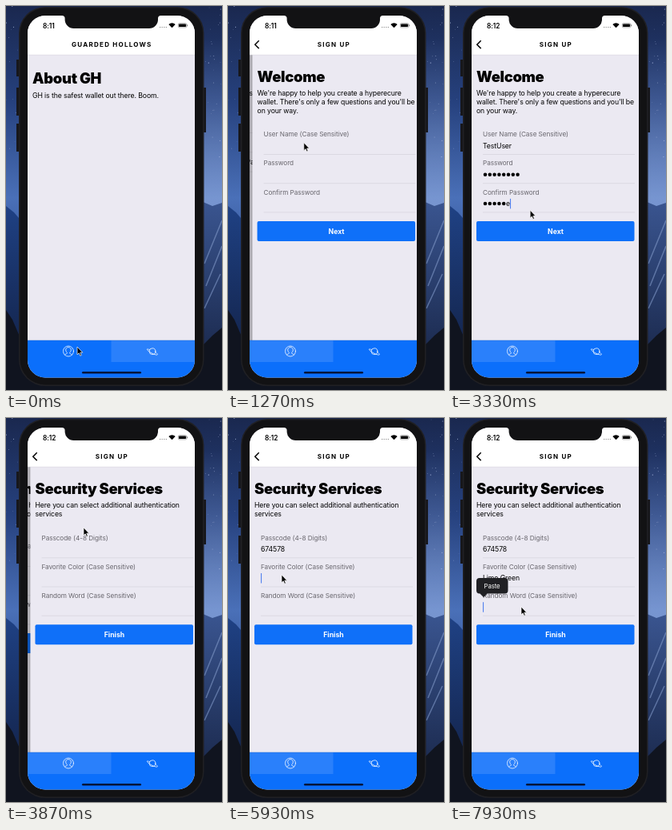
Recreate the animation shown at these times as an HTML page. Size 270x480 px, loop 8 s.

```html
<!DOCTYPE html>
<html lang="en">
<head>
<meta charset="utf-8">
<title>Wallet sign-up</title>
<style>
  html, body { margin: 0; width: 100%; height: 100%; overflow: hidden; background: #101a3a; }
  svg { display: block; width: 100vw; height: 100vh; font: 8.7px Inter, Roboto, sans-serif; letter-spacing: -.1px; }
  .h1 { font-size: 18.4px; font-weight: 900; letter-spacing: -.32px; }
  .title { font-size: 8px; font-weight: 700; letter-spacing: 1.25px; text-anchor: middle; }
  .label { font-size: 8.2px; fill: #68666d; letter-spacing: -.06px; }
  .item { font-size: 9.1px; letter-spacing: -.02px; }
  .button { font-weight: 700; fill: #fff; text-anchor: middle; letter-spacing: 0; }
  .rule { stroke: #d5d3db; stroke-width: .7; }
  .icon { fill: none; stroke: #45434a; stroke-width: .75; stroke-linecap: round; }
  .tab { stroke: #fff; }
  .dots { stroke: #000; stroke-width: 4.5; stroke-linecap: round; stroke-dasharray: 0 5.8; }
  .caret { stroke: #4377ee; stroke-width: 1; }
</style>
</head>
<body>
<svg viewBox="0 0 270 480" preserveAspectRatio="none">
  <defs>
    <linearGradient id="sky" x2="0" y2="1">
      <stop offset="0" stop-color="#1a284f"/>
      <stop offset=".25" stop-color="#26417e"/>
      <stop offset=".5" stop-color="#4a70b8"/>
      <stop offset=".75" stop-color="#2c4a88"/>
    </linearGradient>
    <linearGradient id="glow" x2="0" y2="1">
      <stop offset="0" stop-color="#a9bfec" stop-opacity="0"/>
      <stop offset="1" stop-color="#a9bfec" stop-opacity=".5"/>
    </linearGradient>
    <linearGradient id="leftRock" x2="0" y2="1">
      <stop offset="0" stop-color="#1f4184"/>
      <stop offset="1" stop-color="#101c3c"/>
    </linearGradient>
    <linearGradient id="rightRock" x2="0" y2="1">
      <stop offset="0" stop-color="#3a5590"/>
      <stop offset="1" stop-color="#14203f"/>
    </linearGradient>
    <linearGradient id="edge">
      <stop offset="0" stop-color="#000" stop-opacity="0"/>
      <stop offset="1" stop-color="#000" stop-opacity=".1"/>
    </linearGradient>
    <clipPath id="screen"><rect x="27" y="12" width="209" height="452.500" rx="22"/></clipPath>
    <clipPath id="content"><rect x="27" y="61" width="209" height="357"/></clipPath>
  </defs>

  <rect width="270" height="480" fill="url(#sky)"/>
  <rect x="200" y="40" width="70" height="215" fill="url(#glow)"/>
  <g id="stars" fill="#aebbe0"></g>
  <path d="M0 250 10 258 22 272V480H0Z" fill="url(#leftRock)"/>
  <path d="M270 246 258 250 244 244V480H270Z" fill="url(#rightRock)"/>
  <path d="M270 268 248 322M270 300 250 350M268 335 248 378" stroke="#8199c8" stroke-width="1.500" opacity=".6"/>
  <path d="M0 380 8 392 20 420 60 470H210L246 424 258 412 270 402V480H0Z" fill="#10141f"/>

  <path d="M13 67h5v21h-5zM13 102h5v35h-5zM13 147h5v35h-5zM245 102h5v56h-5z" fill="#17171b"/>
  <rect x="16" y="1" width="231.500" height="474" rx="33" fill="#202024"/>
  <rect x="17.500" y="2.500" width="228.500" height="471" rx="31.500" fill="#121214"/>

  <g clip-path="url(#screen)">
    <rect x="27" y="10" width="209" height="455" fill="#ebe9f2"/>

    <g clip-path="url(#content)">
      <rect x="27" y="61" width="209" height="357" fill="#000"/>
      <g id="about">
        <rect x="27" y="61" width="209" height="357" fill="#ebe9f2"/>
        <text class="h1" x="33" y="97">About GH</text>
        <text x="33" y="115">GH is the safest wallet out there. Boom.</text>
      </g>
      <g id="wallet">
        <rect x="27" y="61" width="209" height="357" fill="#ebe9f2"/>
        <text class="h1" x="33" y="94.500">Hello,</text>
        <text x="33" y="112">Please login or sign up to unlock your wallet</text>
        <g class="icon" transform="translate(.5)">
          <path d="M40.500 140.700a6.300 6.300 0 1 0 6 0M43.500 139v6"/>
          <circle cx="43.500" cy="170.500" r="6.300"/><path d="M43.500 167v7M40 170.500h7"/>
          <circle cx="43.500" cy="194.800" r="6.300"/><circle cx="43.500" cy="194.800" r="3"/>
          <path d="M42 189v3M45 189v3M42 198v3M45 198v3M38 193.300h3M38 196.300h3M46 193.300h3M46 196.300h3"/>
        </g>
        <text class="item" x="59.800" y="149.200">Login</text>
        <text class="item" x="59.800" y="173.700">Sign Up</text>
        <text class="item" x="59.800" y="198">Forgot Password</text>
        <path class="rule" d="M59.500 158.500H236M59.500 182.800H236M33 207.200H236"/>
      </g>
      <g id="signup"></g>
      <g id="security"></g>
    </g>

    <rect x="27" y="10" width="209" height="51" fill="#fff"/>
    <path d="M27 61.200H236" stroke="#d2d1d8" stroke-width=".5"/>
    <text class="title" id="titleOld" x="132.300" y="51"></text>
    <g id="titleNew">
      <text class="title" x="132.300" y="51">SIGN UP</text>
      <path d="M38.700 43.300 33.800 48.200 38.700 53.100" fill="none" stroke="#000" stroke-width="1.500"/>
    </g>

    <text id="clock" x="46" y="27.500" style="font-size:8.300px;font-weight:600"></text>
    <path d="M192 26.500h10" stroke="#888" stroke-width="1.200" stroke-dasharray="1.200 1.400"/>
    <path d="M207.500 27.200 203.300 23a6 6 0 0 1 8.400 0Z"/>
    <rect x="215.300" y="21.700" width="10.400" height="5.200" rx="1.400" fill="none" stroke="#777" stroke-width=".6"/>
    <rect x="216.100" y="22.500" width="8.800" height="3.600" rx=".7"/>
    <path d="M226.700 23.300v2" stroke="#777"/>

    <rect x="27" y="418" width="209" height="47" fill="#0b6ffb"/>
    <rect id="idleTab" y="418" width="104.500" height="27" fill="#2a80fb"/>
    <path d="M27 418H236" stroke="#1f66cc" stroke-width=".5"/>
    <g class="icon tab">
      <circle cx="78" cy="431.500" r="6.500"/>
      <path d="M73.500 436c1-1.500 3-1 3-2.400-3-3-2-7 1.500-7s4.500 4 1.500 7c0 1.400 2 .9 3 2.400"/>
      <circle cx="183" cy="431.700" r="3.900"/>
      <path d="M179.500 429.800c-3-1.600-4-1.200-2.500.5 2.500 2.600 7 5 10.500 5.700 2.800.5 2.300-1.200-.5-3.200"/>
    </g>
    <rect x="95" y="457" width="74" height="2.400" rx="1.200" fill="#06153a"/>
  </g>
  <path d="M70 10H193.500V12Q190 12 190 15.500V17A11 11 0 0 1 179 28H84.600A11 11 0 0 1 73.600 17V15.500Q73.600 12 70 12Z" fill="#121214"/>

  <g id="paste">
    <path d="M37 200H68.500a4 4 0 0 1 4 4V215.500a4 4 0 0 1-4 4H46.500L42 224 37.500 219.500H37a4 4 0 0 1-4-4V204a4 4 0 0 1 4-4Z" fill="#202024"/>
    <text x="52.500" y="212.700" fill="#fff" text-anchor="middle" style="font-size:7.800px">Paste</text>
  </g>
  <path id="pointer" d="M0 0V9.800L2.200 7.800 3.700 11.200 5.300 10.500 3.800 7.200H6.800Z" stroke="#fff" stroke-width=".7"/>
</svg>

<script>
const LOOP = 8000, SLIDE = 320, DOT = 5.8, LEFT = 41;
const TAB_SWITCH = 450, SIGNUP_IN = 1051, SECURITY_IN = 3650;
const $ = id => document.getElementById(id);

// label, text, focus start, typing start, typing end, focus end, masked
const forms = {
  signup: {
    heading: 'Welcome', button: 'Next', top: 163.200,
    intro: ["We're happy to help you create a hyperecure", "wallet. There's only a few questions and you'll be", 'on your way.'],
    fields: [
      ['User Name (Case Sensitive)', 'TestUser', 1430, 1500, 1960, 2130],
      ['Password', 'testtest', 2130, 2230, 2740, 2880, true],
      ['Confirm Password', 'testtest', 2880, 2950, 3470, 3620, true]
    ]
  },
  security: {
    heading: 'Security Services', button: 'Finish', top: 152.500,
    intro: ['Here you can select additional authentication', 'services'],
    fields: [
      ['Passcode (4-8 Digits)', '674578', 4200, 4400, 5500, 5870],
      ['Favorite Color (Case Sensitive)', 'Lime Green', 5870, 6150, 7250, 7670],
      ['Random Word (Case Sensitive)', '', 7670, 8000, 8000, 8000]
    ]
  }
};

// time, x, y
const pointerPath = [
  [70, 89, 426], [350, 179, 428], [500, 179, 428], [960, 132, 169], [1120, 132, 169],
  [1380, 72, 172], [1800, 72, 172], [2030, 75, 197], [2700, 75, 197], [2860, 78, 236],
  [3050, 78, 236], [3320, 100, 255], [3480, 112, 277], [3650, 112, 277], [3870, 97, 137],
  [4100, 70, 161], [5600, 70, 161], [5840, 67, 196], [7300, 67, 196], [7600, 89, 236]
];

const inputs = [];
for (const [id, form] of Object.entries(forms)) {
  const buttonY = form.top + 105.8;
  $(id).innerHTML = `
    <rect x="19" y="61" width="8" height="357" fill="url(#edge)"/>
    <rect x="27" y="61" width="209" height="357" fill="#ebe9f2"/>
    <text class="h1" x="33" y="94.500">${form.heading}</text>
    ${form.intro.map((line, i) => `<text x="33" y="${112.3 + i * 10.7}">${line}</text>`).join('')}
    ${form.fields.map(([label], i) => {
      const y = form.top + i * 36.2;
      return `<text class="label" x="${LEFT}" y="${y}">${label}</text>
        <path class="rule" d="M${LEFT} ${y + 22.3}H231"/>
        <g class="input"><path class="dots"/><text y="${y + 14.7}"/><path class="caret"/></g>`;
    }).join('')}
    <rect x="33" y="${buttonY}" width="197.500" height="25" rx="2" fill="#0f70f9"/>
    <text class="button" x="132" y="${buttonY + 15.8}">${form.button}</text>`;
  $(id).querySelectorAll('.input').forEach((node, i) => {
    const [dots, text, caret] = node.children;
    inputs.push({ dots, text, caret, y: form.top + i * 36.2, field: form.fields[i] });
  });
}

let seed = 7;
const random = () => (seed = seed * 16807 % 2147483647) / 2147483647;
$('stars').innerHTML = Array.from({ length: 40 }, () => {
  const x = random() < .5 ? random() * 16 : 248 + random() * 22;
  return `<circle cx="${x}" cy="${random() * 190}" r="${.2 + random() * .35}"/>`;
}).join('');

// cubic-bezier(.36, .66, .04, 1)
function slideEase(x) {
  if (x <= 0) return 0;
  if (x >= 1) return 1;
  const bezier = (s, a, b) => 3 * (1 - s) ** 2 * s * a + 3 * (1 - s) * s * s * b + s ** 3;
  let low = 0, high = 1;
  for (let i = 0; i < 20; i++) {
    const mid = (low + high) / 2;
    if (bezier(mid, .36, .04) < x) low = mid; else high = mid;
  }
  return bezier(high, .66, 1);
}

function pointerAt(t) {
  const next = pointerPath.findIndex(p => p[0] > t);
  if (next <= 0) return (next ? pointerPath.at(-1) : pointerPath[0]).slice(1);
  const [t0, x0, y0] = pointerPath[next - 1], [t1, x1, y1] = pointerPath[next];
  const u = (t - t0) / (t1 - t0), k = u * u * (3 - 2 * u);
  return [x0 + (x1 - x0) * k, y0 + (y1 - y0) * k];
}

const show = (id, visible) => $(id).style.display = visible ? '' : 'none';

// entered and left run from 0 to 1 as the page slides in and is covered
function placePage(id, entered, left) {
  show(id, entered > 0 && left < 1);
  $(id).setAttribute('transform', `translate(${209 * (1 - entered) - 69 * left})`);
  $(id).setAttribute('opacity', 1 - .2 * left);
}

function drawInput({ dots, text, caret, y, field }, t) {
  const [, value, focus, start, end, blur, masked] = field;
  const step = (end - start) / Math.max(1, value.length - 1);
  const count = t < start ? 0 : Math.min(value.length, 1 + Math.floor((t - start) / step));
  const lastVisible = masked && count > 0 && t < end + 80;
  const hidden = masked ? count - (lastVisible ? 1 : 0) : 0;
  const x = LEFT + hidden * DOT;
  dots.setAttribute('d', hidden ? `M${LEFT + 3} ${y + 11.3}h${(hidden - 1) * DOT + .01}` : '');
  text.setAttribute('x', x);
  text.textContent = value.slice(hidden, count);
  const width = text.textContent ? text.getComputedTextLength() : 0;
  caret.setAttribute('d', t >= focus && t < blur ? `M${x + width + .6} ${y + 5.3}v12.5` : '');
}

function draw(t) {
  const toSignup = slideEase((t - SIGNUP_IN) / SLIDE);
  const toSecurity = slideEase((t - SECURITY_IN) / SLIDE);
  const onAbout = t < TAB_SWITCH;
  show('about', onAbout);
  placePage('wallet', onAbout ? 0 : 1, toSignup);
  placePage('signup', toSignup, toSecurity);
  placePage('security', toSecurity, 0);
  inputs.forEach(input => drawInput(input, t));

  $('titleOld').textContent = onAbout ? 'GUARDED HOLLOWS' : 'WALLET';
  $('titleOld').setAttribute('opacity', 1 - toSignup);
  $('titleNew').setAttribute('opacity', toSignup ** 2);
  $('idleTab').setAttribute('x', onAbout ? 131.5 : 27);
  $('clock').textContent = t < 2700 ? '8:11' : '8:12';
  show('paste', t >= 7850);
  $('pointer').setAttribute('transform', `translate(${pointerAt(t)})`);
}

function tick() {
  draw(performance.now() % LOOP);
  requestAnimationFrame(tick);
}
tick();
</script>
</body>
</html>
```
